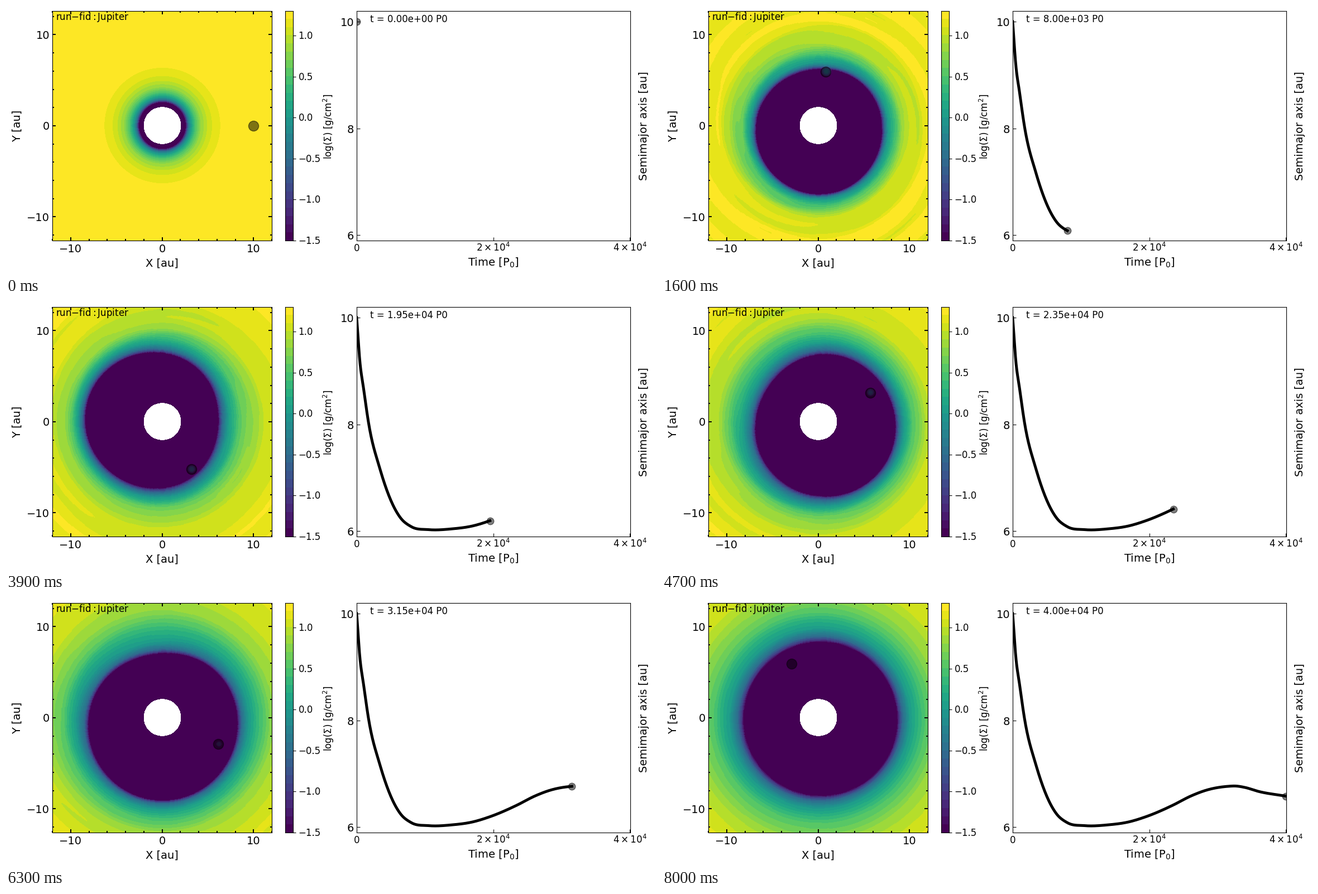
Animation of 1164 by 481 pixels, one loop 8.1 s. Source, as a matplotlib script:

```python
import numpy as np
import matplotlib.pyplot as plt
from matplotlib.animation import FuncAnimation

plt.rcParams["font.family"] = "DejaVu Sans"
W, H, DPI = 1164, 481, 100
FRAMES, INTERVAL = 81, 100
STEP = 500  # orbits of P0 per frame
VMIN, BANDS = -1.5, 28

# Semimajor axis (au) against time (10^3 P0)
TRACK_T = [0, .45, 1, 1.75, 3.4, 5.2, 6.3, 8, 10.5, 14, 17, 19.5, 23.5,
           26, 28.5, 31.5, 32.6, 34, 36, 40]
TRACK_A = [10, 9.2, 8.68, 8.02, 7.17, 6.52, 6.27, 6.085, 6.03, 6.045, 6.1, 6.197,
           6.416, 6.58, 6.70, 6.766, 6.772, 6.745, 6.67, 6.583]

# Disc state at a few moments: radius at which each density level is reached
KEYS = [0, 16, 25, 39, 47, 63, 80]
LEVELS = [-1.5, -1, -.5, 0, .5, .8, 1, 1.1, 1.2]
RADII = np.array([
    [2.5, 2.62, 2.78, 3.05, 3.6, 4.15, 4.85, 5.4, 6.3],
    [6.85, 7.0, 7.2, 7.55, 8.3, 9.2, 10.0, 11.0, 12.2],
    [7.05, 7.2, 7.45, 7.8, 8.7, 9.6, 10.6, 11.9, 14.0],
    [7.37, 7.55, 7.85, 8.4, 9.3, 10.2, 11.6, 13.2, 16.0],
    [7.67, 7.85, 8.2, 8.9, 9.9, 10.9, 12.2, 14.2, 17.0],
    [8.1, 8.3, 8.6, 9.4, 10.8, 12.2, 13.9, 16.0, 19.0],
    [8.35, 8.6, 9.0, 9.8, 11.5, 13.3, 15.2, 17.0, 20.0]])
ECC_SIZE = [0, .7, 1.0, 1.23, 1.05, 1.1, .3]
ECC_ANGLE = [-336, -80, 47, 172, 327, 635, 1044]
WAVE = [0, .07, .06, .04, .04, .025, .012]
CLUMP = [-1.5, -.4, -.5, -.8, -.85, -1.1, -1.6]
PLANET_R = [10, 5.99, 5.96, 6.09, 6.51, 6.80, 6.60]
PLANET_ANGLE = np.radians([0, 81.8, 245.1, -58.5, 29.2, -25, 116.1])


def smooth(x, xs, ys):
    """Cubic Hermite interpolation through the given points."""
    xs, ys = np.asarray(xs, float), np.asarray(ys, float)
    slope = np.gradient(ys, xs)
    i = np.clip(np.searchsorted(xs, x, side="right") - 1, 0, len(xs) - 2)
    h = xs[i + 1] - xs[i]
    u = (x - xs[i]) / h
    return ((1 + 2 * u) * (1 - u) ** 2 * ys[i] + u * (1 - u) ** 2 * h * slope[i]
            + u * u * (3 - 2 * u) * ys[i + 1] + u * u * (u - 1) * h * slope[i + 1])


def at(frame, values):
    return np.interp(frame, KEYS, values)


def wrap(angle):
    return (angle + np.pi) % (2 * np.pi) - np.pi


frames = np.arange(FRAMES)
axis_now = smooth(frames * STEP / 1000, TRACK_T, TRACK_A)
radius_ratio = at(frames, np.array(PLANET_R) / axis_now[KEYS])
orbit = 2 * np.pi * np.cumsum(STEP * (10 / axis_now) ** 1.5)
phase = orbit + at(frames, wrap(PLANET_ANGLE - orbit[KEYS]))
planet_x = axis_now * radius_ratio * np.cos(phase)
planet_y = axis_now * radius_ratio * np.sin(phase)

# Pixel grid of the disc, snapped to the cells of a polar mesh
NX, NY, XMAX, YMAX = 393, 412, 12.0, 12.6
X, Y = np.meshgrid(((np.arange(NX) + .5) / NX * 2 - 1) * XMAX,
                   (1 - (np.arange(NY) + .5) / NY * 2) * YMAX)
CELL_R, CELL_PHI = .06, 2 * np.pi / 400
R = (np.floor(np.hypot(X, Y) / CELL_R) + .5) * CELL_R
PHI = (np.floor(np.arctan2(Y, X) / CELL_PHI) + .5) * CELL_PHI
HOLE = np.hypot(X, Y) < 2
PALETTE = (plt.get_cmap("viridis")(np.linspace(0, 1, BANDS)) * 255).round().astype(np.uint8)


def disc(frame):
    radii = np.array([at(frame, column) for column in RADII.T])
    size, angle = at(frame, ECC_SIZE), np.radians(at(frame, ECC_ANGLE))
    turn = PHI - angle
    shift = size * (np.cos(turn) + .08 * np.cos(2 * turn + 1) + .1 * np.cos(3 * turn))
    fade = np.exp(-np.clip(R - radii[0], 0, None) / 3)
    density = np.interp(R - shift * fade, radii, LEVELS)

    spiral = PHI - phase[frame] + 2.2 * (R - axis_now[frame])
    ripple = np.cos(spiral) + .6 * np.sin(2 * PHI + 5 * R + frame) * np.cos(3 * PHI - frame)
    density = density + at(frame, WAVE) * ripple * (density > VMIN)

    near = (X - planet_x[frame]) ** 2 + (Y - planet_y[frame]) ** 2
    density = np.maximum(density, at(frame, CLUMP) - 3 * near)
    band = np.clip(np.floor((density - VMIN) * 10 + 1e-6), 0, BANDS - 1).astype(int)
    image = PALETTE[band]
    image[HOLE] = 255
    return image


# The small margin keeps the pixel size from being rounded down
fig = plt.figure(figsize=((W + .01) / DPI, (H + .01) / DPI), dpi=DPI, facecolor="white")


def panel(x0, y0, x1, y1):
    return fig.add_axes([x0 / W, 1 - y1 / H, (x1 - x0) / W, (y1 - y0) / H])


def label(x, y, text, size, ha="center", rotation=0):
    return fig.text(x / W, 1 - y / H, text, fontsize=size, ha=ha, va="baseline",
                    rotation=rotation, rotation_mode="anchor")


# Disc panel
ax = panel(83, 9, 476, 421)
picture = ax.imshow(disc(0), extent=(-XMAX, XMAX, -YMAX, YMAX), aspect="auto",
                    interpolation="nearest")
planet, = ax.plot([], [], "o", color="k", ms=13, alpha=.5)
ax.set(xlim=(-XMAX, XMAX), ylim=(-YMAX, YMAX))
for axis in (ax.xaxis, ax.yaxis):
    axis.set_ticks([-10, 0, 10])
    axis.set_ticks([v for v in range(-12, 13, 2) if v % 10], minor=True)
ax.tick_params(which="both", direction="in", top=True, right=True, width=1.4,
               labelbottom=False, labelleft=False)
ax.tick_params(which="major", length=4.5)
ax.tick_params(which="minor", length=2)
for value in (-10, 0, 10):
    name = str(value).replace("-", "\u2212")
    label(279.5 + value * 16.37, 442, name, 14)
    label(78, 222 - value * 16.35, name, 14, "right")
label(279.5, 467, "X [au]", 14)
label(26, 215, "Y [au]", 14, rotation=90)
label(89, 25, r"run$-$fid$:$Jupiter", 12, "left")

# Colour bar
bar = panel(500, 9, 514, 421)
bar.imshow(PALETTE[:, None], extent=(0, 1, VMIN, 1.3), origin="lower", aspect="auto",
           interpolation="nearest")
bar.set_xticks([])
bar.yaxis.tick_right()
bar.set_yticks(np.arange(-1.5, 1.1, .5))
bar.tick_params(labelright=False)
for value in np.arange(-1.5, 1.1, .5):
    label(523.5, 206.3 - value * 147.1, f"{value:.1f}".replace("-", "\u2212"), 12, "left")
label(584, 216, r"log($\Sigma$) [g/cm$^2$]", 12, rotation=90)

# Migration track
plot = panel(628, 9, 1118, 421)
plot.set(xlim=(0, 40050), ylim=(5.9, 10.2), xticks=[0, 20000, 40000], yticks=[6, 8, 10])
plot.tick_params(direction="in", length=4, labelbottom=False, labelleft=False)
dot, = plot.plot([], [], "o", color="k", ms=9, alpha=.5)
track, = plot.plot([], [], color="k", lw=3.6)
for value in (6, 8, 10):
    label(623, 36 + (10 - value) * 95.8, str(value), 14, "right")
for x, name in ((628, "0"), (872.5, r"$2\times10^4$"), (1117.5, r"$4\times10^4$")):
    label(x, 440, name, 12)
label(873, 467, r"Time [P$_0$]", 14)
label(1148, 215.5, "Semimajor axis [au]", 14, rotation=90)
clock = label(652, 29, "", 12, "left")


def update(frame):
    time = frame * STEP
    picture.set_data(disc(frame))
    planet.set_data([planet_x[frame]], [planet_y[frame]])
    times = np.linspace(0, time, 5 * frame + 1)
    track.set_data(times, smooth(times / 1000, TRACK_T, TRACK_A))
    dot.set_data([time], [axis_now[frame]])
    clock.set_text(f"t = {time:.2e} P0")
    return picture, planet, track, dot, clock


anim = FuncAnimation(fig, update, frames=FRAMES, interval=INTERVAL, repeat=True,
                     repeat_delay=0, init_func=lambda: update(0))
plt.show()
```
